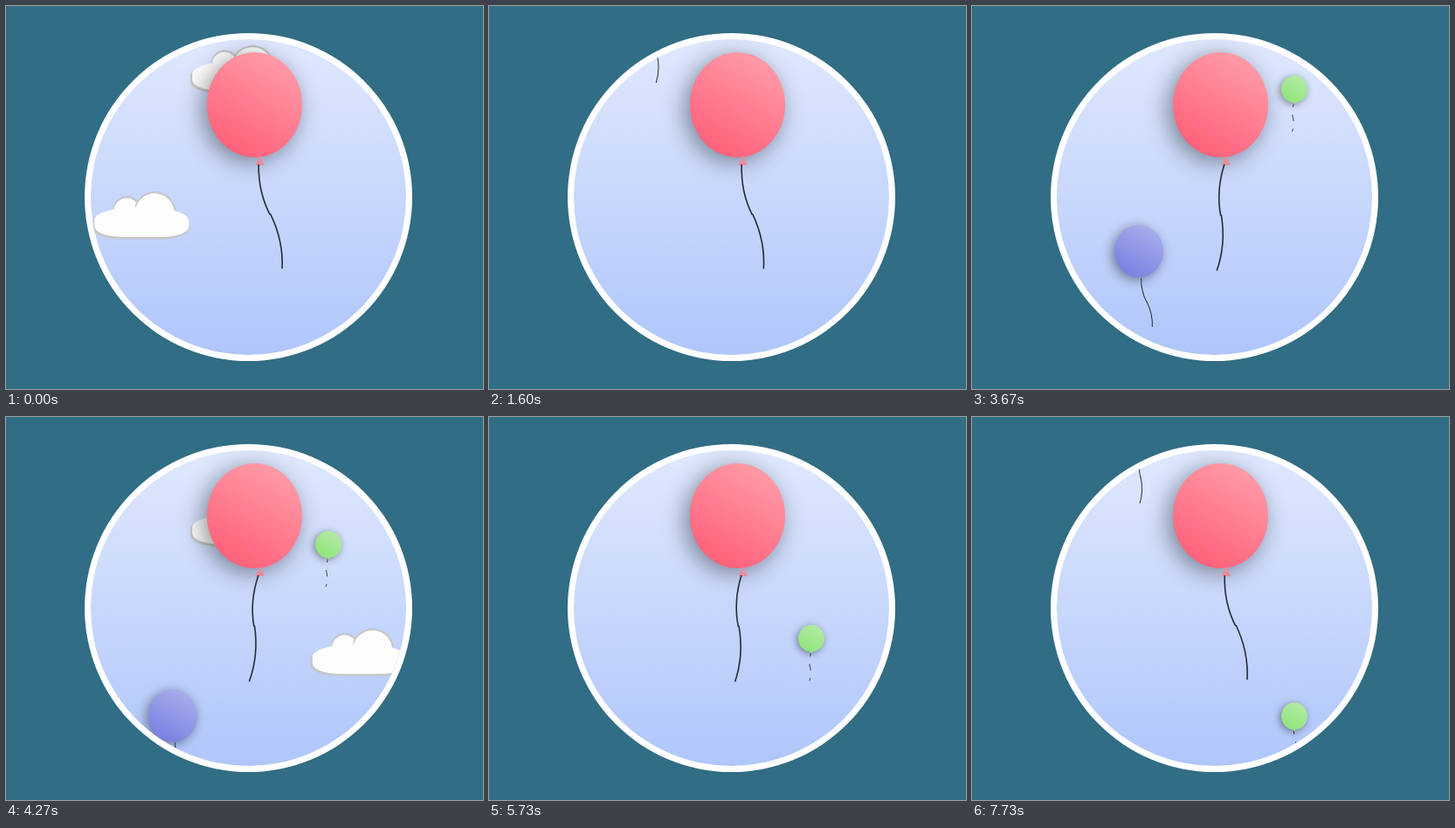
These frames come from a looping animation (546x438 px, 7790 ms). An HTML page with a canvas:

```html
<!DOCTYPE html>
<html lang="en">
<head>
<meta charset="utf-8">
<title>Balloon ride</title>
<style>
  html, body { margin: 0; width: 100%; height: 100%; overflow: hidden; background: #316d84; }
  canvas { display: block; }
</style>
</head>
<body>
<canvas id="stage" width="546" height="438"></canvas>
<script>
const ctx = document.getElementById('stage').getContext('2d');
const LOOP = 7790, STEP = 1000 / 15, TAU = Math.PI * 2;

// Cloud passes: left edge, time (s), bottom edge at that time, speed (px/s), first visible time
const passes = [
  [211, 0.255, 149, 262, 0], [211, 4.27, 149, 262, 3],
  [99, 0.067, 267, 435, 0], [99, 4.87, 285, 435, 4], [99, 6.8, 147, 440, 6],
  [348.5, 0.4, 350, 450, 0.32], [348.5, 4.27, 298, 450, 3], [348.5, 6.8, 151, 440, 6]
];
const bluePath = [[1.6, 0], [2.87, 177], [4.27, 342], [4.87, 380]];
const greenPath = [[2.87, 31], [4.27, 146], [4.87, 194], [6.8, 307], [7.73, 342]];

// Smooth polynomial through a few [time, value] points
const through = (points, t) => points.reduce((sum, [ti, yi]) =>
  sum + points.reduce((y, [tj]) => tj === ti ? y : y * (t - tj) / (ti - tj), yi), 0);

// String angle in degrees, eased between -6 and 12
function sway(t, peak, period) {
  const c = Math.cos(TAU * (t - peak) / period);
  return 3 + 8.9 * c * (1.5 - 0.5 * c * c);
}

function disc(x, y, rx, ry, fill) {
  ctx.fillStyle = fill;
  ctx.beginPath();
  ctx.ellipse(x, y, rx, ry, 0, 0, TAU);
  ctx.fill();
}

function gradient(x0, y0, x1, y1, from, to) {
  const g = ctx.createLinearGradient(x0, y0, x1, y1);
  g.addColorStop(0, from);
  g.addColorStop(1, to);
  return g;
}

const body = new Path2D('M0-22C4-30 25-36 55-36C88-36 111-29 111-18L111-13C110-4 95 0 78 0L36 0C14 0 0-5 0-14Z');

function cloud(x, bottom) {
  ctx.save();
  ctx.translate(x, bottom);
  for (const [cx, cy, r] of [[39.5, -33.5, 16], [71.5, -31, 24]]) {
    disc(cx, cy, r, r, '#c6c8ca');
    disc(cx - 0.4, cy + 1, r - 1.5, r - 1.5, '#fdfdfd');
  }
  ctx.fillStyle = '#c6c8ca';
  ctx.fill(body);
  ctx.translate(2.2, -2.8);
  ctx.scale(0.975, 0.95);
  ctx.fillStyle = '#fdfdfd';
  ctx.fill(body);
  ctx.restore();
}

const string = new Path2D('M-1 1Q-8 32 0 60M0.5 59Q9 92 1 123');
const knot = new Path2D('M1-9L-5 2L6 2Z');

function balloon({ x, y, rx, ry, dark, light, tie, hang, size, line, dash = [], blur, angle }) {
  ctx.save();
  ctx.shadowColor = 'rgba(0,0,0,.42)';
  ctx.shadowBlur = blur;
  ctx.shadowOffsetX = -blur / 5;
  ctx.shadowOffsetY = blur / 5;
  disc(x, y, rx, ry, gradient(x - rx * 0.5, y + ry * 0.8, x + rx * 0.5, y - ry * 0.8, dark, light));
  ctx.restore();

  ctx.save();
  ctx.translate(x + hang[0], y + hang[1]);
  ctx.scale(size, size);
  if (tie) {
    ctx.fillStyle = tie;
    ctx.fill(knot);
  }
  ctx.rotate(-angle * Math.PI / 180);
  ctx.strokeStyle = '#262c36';
  ctx.lineWidth = line / size;
  ctx.setLineDash(dash);
  ctx.stroke(string);
  ctx.restore();
}

function draw(t) {
  ctx.fillStyle = '#316d84';
  ctx.fillRect(0, 0, 546, 438);
  disc(277.5, 218.5, 187.5, 187.5, '#fff');
  disc(277.5, 218.5, 180.5, 180.5, gradient(0, 38, 0, 399, '#dfe8fd', '#b0c6fb'));

  ctx.save();
  ctx.clip();
  for (const [x, at, bottom, speed, from] of passes) {
    const y = bottom + speed * (t - at);
    if (t >= from && y > 30 && y < 470) cloud(x, y);
  }

  const blueTime = t % 6.05;
  if (blueTime > 1 && blueTime < 5.23) balloon({
    x: 191, y: through(bluePath, blueTime), rx: 28, ry: 30, dark: '#7c82e1', light: '#a5abeb',
    hang: [3, 30], size: 0.47, line: 1, blur: 13, angle: sway(blueTime, 3.6, 6)
  });

  const angle = sway(t, 0.62, 8);
  if (t > 2.1) balloon({
    x: 369, y: through(greenPath, t), rx: 15, ry: 15.5, dark: '#92e57d', light: '#b1eaa3',
    tie: '#a9dfa4', hang: [-0.3, 16.5], size: 0.275, line: 0.9, dash: [14, 32, 12, 10, 80, 0], blur: 9, angle
  });

  balloon({
    x: 284.5, y: 113, rx: 54.5, ry: 60, dark: '#ff637c', light: '#ff98a5',
    tie: '#e48f9c', hang: [5.5, 67], size: 1, line: 1.6, blur: 27, angle
  });
  ctx.restore();
}

function tick() {
  const step = Math.floor((performance.now() % LOOP + 4) / STEP);
  // The motion rests for one step early in the loop
  draw((step < 6 ? step + 1 : step) * STEP / 1000);
  requestAnimationFrame(tick);
}
tick();
</script>
</body>
</html>
```
